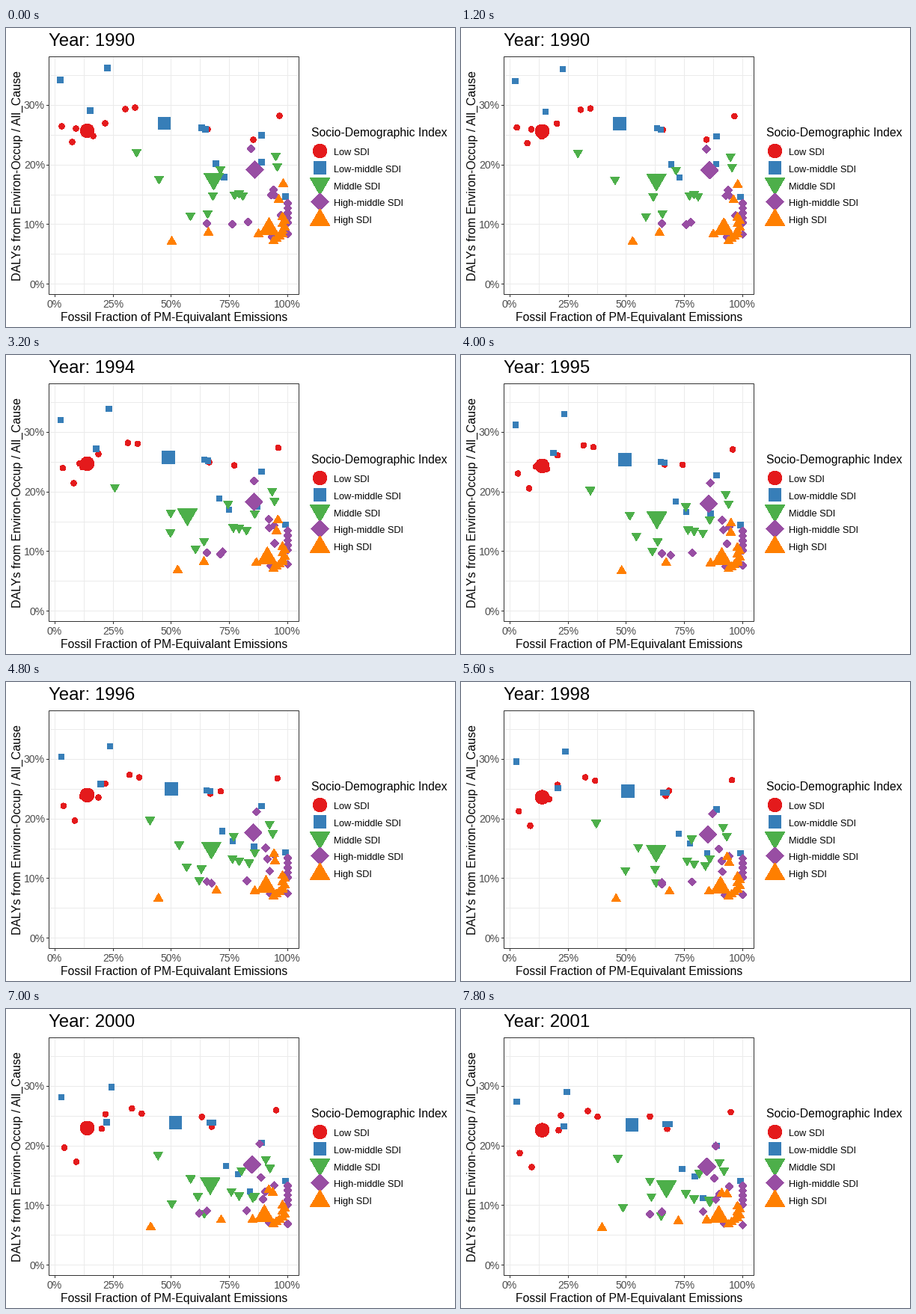
Recreate the animation shown at these times as a matplotlib script. Size 600 by 400 pixels, loop 8000 ms.

```python
import numpy as np
import matplotlib.pyplot as plt
from matplotlib.animation import FuncAnimation
from matplotlib.collections import PolyCollection

W, H, DPI = 600, 400, 100
PX = 72 / DPI                     # points per pixel
HOLD, FRAMES, INTERVAL = 5, 40, 200
LAST = FRAMES - 1 - HOLD
BASE = 342                        # height of the 0% line

plt.rcParams["font.family"] = "Liberation Sans"

# Marker outlines around their centre, y pointing down
TURN = np.linspace(0, 2 * np.pi, 41)
CIRCLE = np.column_stack([np.cos(TURN), np.sin(TURN)])
SQUARE = np.array([(-1, -1), (1, -1), (1, 1), (-1, 1)])
DIAMOND = np.array([(0, -1), (1, 0), (0, 1), (-1, 0)])
UP = np.array([(0, -.866), (1, .866), (-1, .866)])
DOWN = -UP

fig = plt.figure(figsize=(W / DPI, H / DPI), dpi=DPI, facecolor="white")
ax = fig.add_axes([0, 0, 1, 1])
ax.set_xlim(-0.5, W - 0.5)        # whole numbers are pixel centres
ax.set_ylim(H - 0.5, -0.5)
ax.axis("off")


def label(x, y, text, px, color="black", ha="left", **kw):
    return ax.text(x, y, text, fontsize=px * PX, color=color, ha=ha,
                   va="baseline", **kw)


def line(xs, ys, color):
    ax.plot(xs, ys, color=color, lw=PX, zorder=1, snap=False,
            solid_capstyle="butt")


def dip(step):
    """Fading swing, 0 to 1, that slows down as the years pass."""
    phase = (np.sqrt(25 + 8 * step) - 5) / 4
    return (1 - np.cos(2 * np.pi * phase)) / 2 * (1 - step / LAST)


class Group:
    """Points (x, y, drift, fall, sway): fall is the share of height lost."""

    def __init__(self, row, name, color, shape, small, big, fall, mean, points):
        self.shape, self.small, self.big, self.fall = shape, small, big, fall
        self.points, self.mean = points, mean
        self.key = (419, 164 + 22.7 * row)
        if shape is UP or shape is DOWN:
            self.key = (419, self.key[1] + 2 * np.sign(shape[0, 1]))
        self.art = PolyCollection([], facecolors=color, linewidths=0,
                                  antialiaseds=False, snap=False, zorder=2 + row)
        ax.add_collection(self.art, autolim=False)
        label(437.5, 169.5 + 22.8 * row, name, 12.8)

    def place(self, step, x, y, drift=0, fall=None, sway=0):
        fall = self.fall if fall is None else fall
        t = step / LAST
        return x + drift * t - sway * dip(step), y + (BASE - y) * fall * t

    def move(self, step):
        verts = [self.shape * self.small + self.place(step, *p)
                 for p in self.points]
        verts.append(self.shape * self.big + self.place(step, *self.mean))
        verts.append(self.shape * self.big + self.key)
        self.art.set_verts(verts)


# Grid, ticks and frame
for i in range(9):
    x = round(65 + 38.875 * i)
    line([x, x], [39, 355], "#EBEBEB")
    if i % 2 == 0:
        line([x, x], [356.5, 359.5], "#333333")
        label(x - 0.5, 373, f"{i * 12.5:.0f}%", 14, "#4D4D4D", "center")
for i in range(8):
    y = round(BASE - 39.83 * i)
    line([58, 390], [y, y], "#EBEBEB")
    if i % 2 == 0:
        line([53.5, 56.5], [y, y], "#333333")
        label(51.5, y + 5, f"{i * 5}%", 14, "#4D4D4D", "right")
ax.add_patch(plt.Rectangle((57, 38), 334, 318, fill=False, ec="#333333",
                           lw=PX, zorder=20, snap=False))

title = label(56.5, 24, "", 24)
label(224, 391.5, "Fossil Fraction of PM-Equivalant Emissions", 15.7, ha="center")
label(19, 197.5, "DALYs from Environ-Occup / All_Cause", 16, ha="center",
      rotation=90, rotation_mode="anchor")
label(407.5, 144, "Socio-Demographic Index", 15.8)

groups = [
    Group(0, "Low SDI", "#E41A1C", CIRCLE, 3.7, 9.2, 0.12, (108, 137, 0), [
        (74, 131, 4, .29), (88, 152, 6, .31), (93, 134, 15, .16),
        (116, 144, 14, .09, 30), (132, 127, 1, .07, 15), (159, 108, 10),
        (172, 106, 10, .16), (269, 135, 6), (330, 149, -78, -.03),
        (365, 117, -5, .09)]),
    Group(1, "Low-middle SDI", "#377EB8", SQUARE, 3.6, 8.5, 0.2,
          (211, 127, 17, .13), [
        (72, 69, 2), (135, 53, 6), (112, 110, 25), (261, 133, 12, .1),
        (266, 135, 12, .09), (280, 181, 15), (291, 199, 21, .17),
        (341, 143), (341, 179, -18, .45), (373, 225, 0, .04)]),
    Group(2, "Middle SDI", "#4DAF4A", DOWN, 6, 13, 0.2,
          (277, 205, -3, .26, 55), [
        (174, 167, 35, .19, 65), (204, 203, 48), (246, 252, 21, .28),
        (269, 249, -15, .03), (276, 225, -60, .35, 60), (286, 190, 32),
        (305, 224, -5), (311, 222, 0, .27), (316, 225, 15, .27),
        (332, 191, 0, .45), (360, 172, -15), (362, 186, -11)]),
    Group(3, "High-middle SDI", "#984EA3", DIAMOND, 5.3, 11.6, 0.12,
          (332, 189, -4, .14), [
        (327, 161, 13), (357, 216, -19, .08), (354, 223, -9, .2), (358, 223),
        (268, 261), (302, 262, -50, .15), (323, 259, 0, .14, 55),
        (367, 250, -27, .05), (355, 279, -4), (376, 275, 0, .2)]
        + [(376, 234 + 6.5 * i, 0, .02) for i in range(5)]),
    Group(4, "High SDI", "#FF7F00", UP, 6, 13, 0.12, (351, 264.5, -7), [
        (221, 283.5, -33, .12, -30), (270, 271.5, 20, .14, 20),
        (337, 273.5, -9, .1), (364, 227.5, -9, .16), (370, 206.5, -22, .28)]
        + [(369 + 3 * (i % 2), 251 + 4.5 * i) for i in range(5)]
        + [(357 + 4 * i, 283 - 3 * i, 0, .05) for i in range(4)]),
]


def update(frame):
    step = max(0, frame - HOLD)
    title.set_text(f"Year: {1990 + int(step / 3 + 0.5)}")
    for g in groups:
        g.move(step)
    return []


anim = FuncAnimation(fig, update, frames=FRAMES, interval=INTERVAL,
                     init_func=lambda: update(0), repeat=True, blit=False)
plt.show()
```
